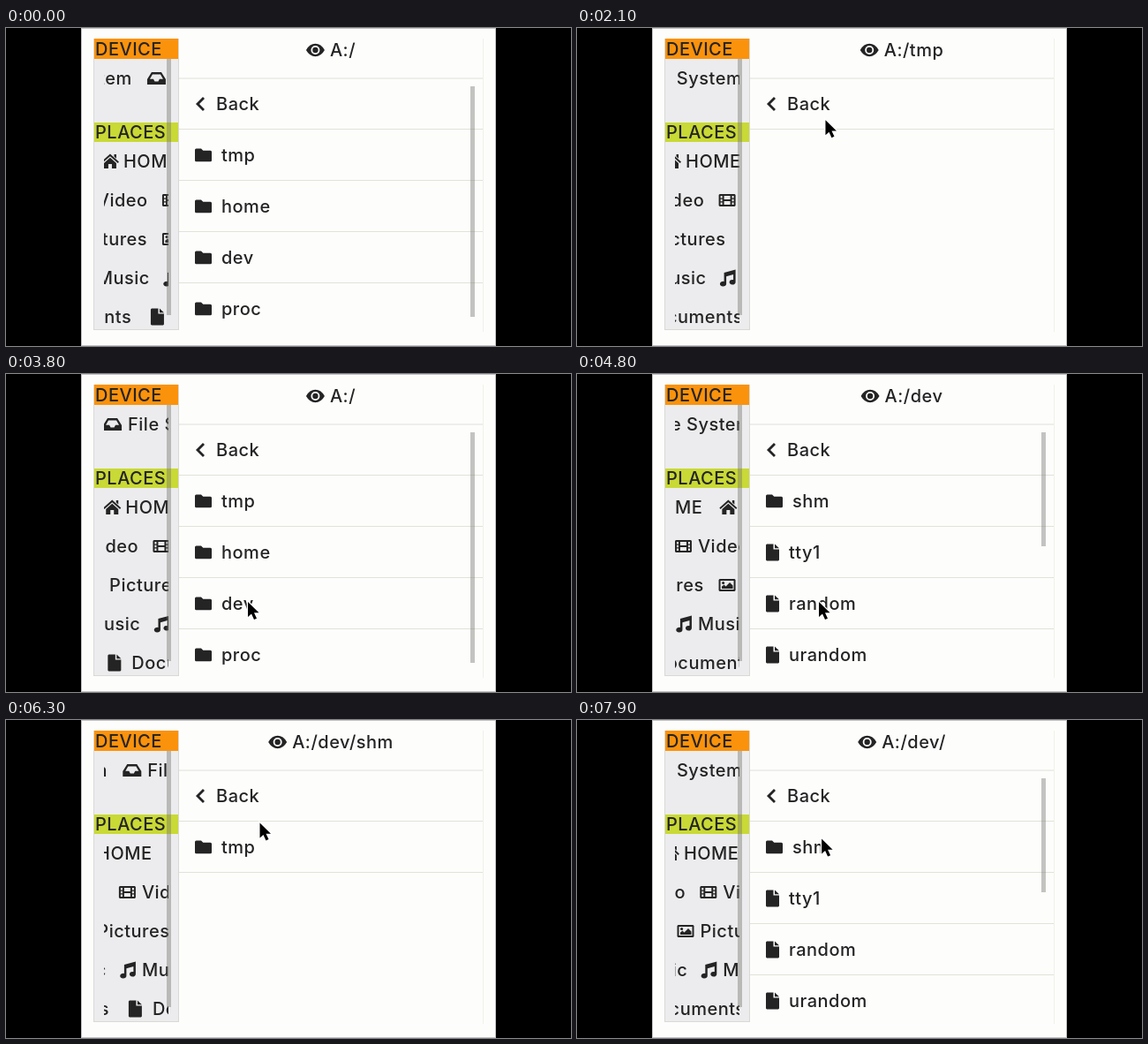
An HTML page with a canvas for the animation above (8 s loop, 640x360 px).

```html
<!DOCTYPE html>
<html lang="en">
<head>
<meta charset="utf-8">
<title>File explorer</title>
<style>
  html, body { margin: 0; width: 100%; height: 100%; overflow: hidden; background: #000; }
  canvas { display: block; }
</style>
</head>
<body>
<canvas id="stage" width="640" height="360"></canvas>
<script>
const ctx = document.getElementById('stage').getContext('2d');
const LOOP = 8000, SPEED = 55.5;
const INK = '#242424', PAPER = '#fdfdfc', LINE = '#e2e2d8', BAR = 'rgba(115,115,108,.42)';

// Icons start at x = 0 and are centred on y = 0.
const icons = {
  drive: 'M5-7H16L21 1V7H0V1ZM6-4.5L3 .8H7L8.5 3.5H12.5L14 .8H18L15-4.5Z',
  home: 'M0 .5L10-8.5L20 .5L18.8 2L10-5.8L1.2 2ZM3 2L10-4.2L17 2V8H12V3H8V8H3ZM14.5-8H17V-3.2L14.5-5.4Z',
  film: 'M1-7H18L19-6V6L18 7H1L0 6V-6ZM2-5V-2.5H4V-5ZM2-1.2V1.2H4V-1.2ZM2 2.5V5H4V2.5Z' +
    'M15-5V-2.5H17V-5ZM15-1.2V1.2H17V-1.2ZM15 2.5V5H17V2.5ZM6-5V-1H13V-5ZM6 1V5H13V1Z',
  picture: 'M1-7H18L19-6V6L18 7H1L0 6V-6ZM2-5V5H17V-5ZM3.5 4V1.5L6-.5L8 1.5L12.5-3L16 .5V4Z' +
    'M3.5-2.5a1.6 1.6 0 1 0 3.2 0a1.6 1.6 0 1 0-3.2 0Z',
  music: 'M6-6L19-9.5V4.5A3.5 2.8 0 1 1 16.5 2V-4L8.5-1.7V6.5A3.6 2.8 0 1 1 6 4Z',
  file: 'M1-9.5H8.5V-3.5H15V8.5L14 9.5H1L0 8.5V-8.5ZM10-9.5L15-4.8H10Z',
  folder: 'M1.5-7.5H7L9.3-5.2H17.5Q19-5.2 19-3.7V5.7Q19 7.2 17.5 7.2H1.5Q0 7.2 0 5.7V-6Q0-7.5 1.5-7.5Z',
  eye: 'M0 0Q4-7.2 10.5-7.2T21 0Q17 7.2 10.5 7.2T0 0ZM5.5 0a5 5 0 1 0 10 0a5 5 0 1 0-10 0Z' +
    'M7.3 0a3.2 3.2 0 1 0 6.4 0a3.2 3.2 0 1 0-6.4 0Z',
  back: 'M9-8L11-6L5 0L11 6L9 8L1 0Z',
  arrow: 'M0 0V17L4 13.5L7 20L10 18.7L7 12.3H12.5Z'
};
for (const name in icons) icons[name] = new Path2D(icons[name]);

// icon, label, label offset, y, x at time 0, repeat distance
const places = [
  ['drive', 'File System', 28, 57, 160, 161],
  ['home', 'HOME', 25, 151, 108, 106.6],
  ['film', 'Video', 26, 195, 177, 100.2],
  ['picture', 'Pictures', 26, 239, 177, 125],
  ['music', 'Music', 26, 283, 177, 100.2],
  ['file', 'Documents', 27, 327, 164, 162.3]
];

const root = ['tmp/', 'home/', 'dev/', 'proc/'];
const dev = ['shm/', 'tty1', 'random', 'urandom'];
// start time, path, entries, scrollbar end (0 = none)
const screens = [
  [0, 'A:/', root, 327],
  [1500, 'A:/tmp', [], 0],
  [2700, 'A:/', root, 327],
  [4300, 'A:/dev', dev, 195],
  [5700, 'A:/dev/shm', ['tmp/'], 0],
  [7000, 'A:/dev/', dev, 195]
];

// pointer stops: time, x, y
const stops = [
  [200, 470, 362], [1000, 277, 145], [1700, 277, 145], [2300, 283, 90],
  [2800, 283, 90], [3600, 274, 258], [4900, 274, 258], [5400, 284, 143],
  [5950, 284, 143], [6650, 291, 90], [7400, 291, 90], [8000, 276, 138]
];

function box(x, y, w, h, color) {
  ctx.fillStyle = color;
  ctx.fillRect(x, y, w, h);
}

function text(str, x, y) {
  ctx.fillStyle = INK;
  ctx.fillText(str, x, y + 7);
}

function icon(name, x, y) {
  ctx.save();
  ctx.translate(x, y);
  ctx.fillStyle = INK;
  ctx.fill(icons[name], 'evenodd');
  ctx.restore();
}

function drawSidebar(t) {
  box(99, 12, 97, 330, '#d9d9d4');
  box(100, 12, 95, 329, '#ececee');
  box(100, 12, 95, 23, '#fb920c');
  box(100, 107, 95, 22, '#c9d935');
  text('DEVICE', 101, 24);
  text('PLACES', 101, 118);

  ctx.save();
  ctx.beginPath();
  ctx.rect(111, 35, 73, 306);
  ctx.clip();
  for (const [name, label, offset, y, start, period] of places) {
    // Begin one repeat early so the outgoing copy is always present.
    let x = start - SPEED * t / 1000 % period - period;
    for (; x < 184; x += period) {
      icon(name, x, y);
      text(label, x + offset, y);
    }
  }
  ctx.restore();
  box(182, 35, 5, 290, BAR);
}

function drawFiles([, path, entries, barEnd]) {
  const left = 368 - (27 + ctx.measureText(path).width) / 2;
  icon('eye', left, 25);
  text(path, left + 27, 25);
  box(196, 56.5, 344, 1, LINE);
  box(540, 12, 1, 332, '#f0f0ea');

  icon('back', 214, 86);
  text('Back', 238, 86);
  box(196, 114, 344, 1, LINE);
  entries.forEach((entry, i) => {
    const y = 144 + 58 * i, isFolder = entry.endsWith('/');
    icon(isFolder ? 'folder' : 'file', 214, y);
    text(entry.replace('/', ''), isFolder ? 244 : 240, y);
    if (i < 3) box(196, y + 28, 344, 1, LINE);
  });
  if (barEnd) box(526, 66, 5, barEnd - 66, BAR);
}

function drawPointer(t) {
  const i = stops.findIndex(s => s[0] > t);
  if (i < 1) return;
  const [t0, x0, y0] = stops[i - 1], [t1, x1, y1] = stops[i];
  const p = (t - t0) / (t1 - t0), ease = p * p * (3 - 2 * p);
  ctx.save();
  ctx.translate(x0 + (x1 - x0) * ease, y0 + (y1 - y0) * ease);
  ctx.strokeStyle = '#fff';
  ctx.lineWidth = 2.5;
  ctx.stroke(icons.arrow);
  ctx.fillStyle = '#000';
  ctx.fill(icons.arrow);
  ctx.restore();
}

function draw(now) {
  const t = now % LOOP;
  box(0, 0, 640, 360, '#000');
  box(85, 0, 470, 360, '#c4c4c4');
  box(86, 1, 468, 358, PAPER);
  ctx.font = '500 20px Inter, "Open Sans", sans-serif';
  ctx.letterSpacing = '0.5px';
  drawSidebar(t);
  drawFiles(screens.findLast(s => s[0] <= t));
  drawPointer(t);
}

const begin = performance.now();
function tick() {
  draw(performance.now() - begin);
  requestAnimationFrame(tick);
}
tick();
</script>
</body>
</html>
```
